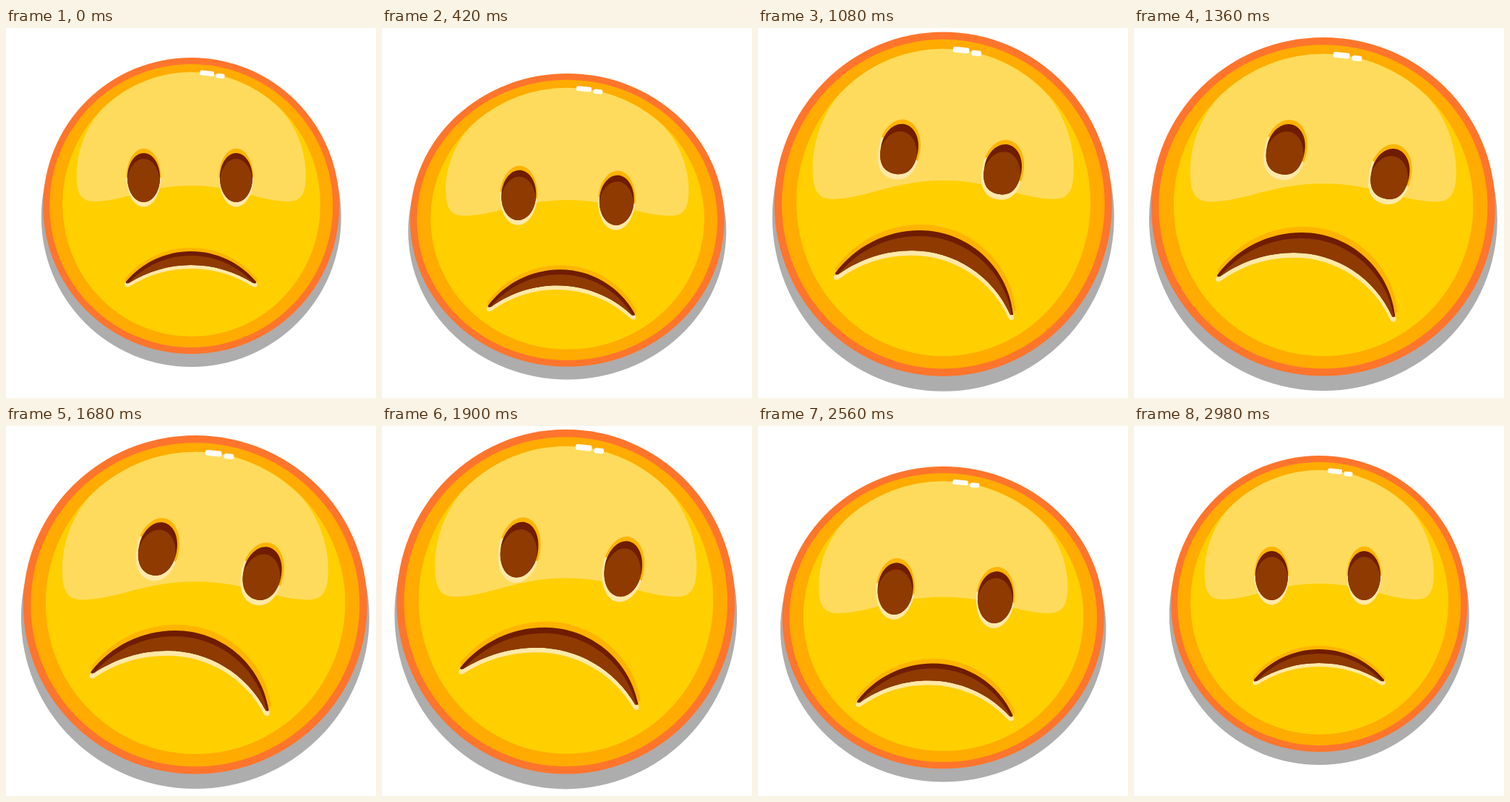
An HTML page with a canvas that plays this animation: 512x512 px, repeating every 3000 ms.

```html
<!DOCTYPE html>
<html lang="en">
<head>
<meta charset="utf-8">
<title>Sad face</title>
<style>
  html, body { margin: 0; width: 100%; height: 100%; overflow: hidden; background: #fff; }
  canvas { display: block; width: 100vmin; height: 100vmin; }
</style>
</head>
<body>
<canvas id="stage" width="512" height="512"></canvas>
<script>
const ctx = document.getElementById('stage').getContext('2d');
const LOOP = 3000, TAU = Math.PI * 2, CX = 256.3;
const SHADE = '#ffb400', CREAM = '#ffe8a8', BROWN = '#8f3a00', DARK = '#701c00';

// Smooth step from 0 at time a to 1 at time b
function ease(t, a, b) {
  const u = Math.min(1, Math.max(0, (t - a) / (b - a)));
  return u * u * (3 - 2 * u);
}
const pulse = (t, a, b, c, d) => ease(t, a, b) - ease(t, c, d);
const swayAt = t => t > 1120 && t < 2080 ? -Math.sin(TAU * (t - 1120) / 320) : 0;

function ellipse(color, x, y, rx, ry) {
  ctx.fillStyle = color;
  ctx.beginPath();
  ctx.ellipse(x, y, rx, ry, 0, 0, TAU);
  ctx.fill();
}

function within(paint) {
  ctx.save();
  paint();
  ctx.restore();
}

const shine = new Path2D(
  'M0-185A178.5 183 0 0 0-119-138C-145-114-158-75-158.5-46' +
  'C-159-17-153-6-134-6C-95-6-60-28 0-28C60-28 95-6 134-6' +
  'C153-6 159-17 158.5-46C158-75 145-114 119-138A178.5 183 0 0 0 0-185Z');

function glint(x, y, w, h) {
  within(() => {
    ctx.translate(x, y);
    ctx.rotate(0.1);
    ctx.fillStyle = '#fff';
    ctx.beginPath();
    ctx.roundRect(-w / 2, -h / 2, w, h, 2.6);
    ctx.fill();
  });
}

function drawBody(x, y, rx, ry) {
  within(() => {
    ctx.translate(x, y);
    ctx.scale(rx / 205, ry / 205);
    ellipse('rgba(0,0,0,.32)', 0, 15.5, 207.5, 207.5);
    ellipse('#ff752c', 0, 0, 205, 205);
    ellipse('#ffab00', 0, 0, 196, 196);
    ellipse('#ffcf00', 0.3, -2, 178.5, 183);
    ctx.fillStyle = '#ffdb5d';
    ctx.fill(shine);
    glint(21.8, -183.4, 19.8, 6.8);
    glint(40.2, -179.6, 12, 6.4);
  });
}

// Upper half is an ellipse; square pushes out the corners of the lower half
function eyePath(w, h, square) {
  const k = 0.5523, p = new Path2D();
  p.moveTo(-w, 0);
  p.bezierCurveTo(-w, -h * k, -w * k, -h, 0, -h);
  p.bezierCurveTo(w * k, -h, w, -h * k, w, 0);
  p.bezierCurveTo(w, h * k, w * (k + square), h, 0, h);
  p.bezierCurveTo(-w * (k + square), h, -w, h * k, -w, 0);
  return p;
}

function drawEye(x, y, tilt, w, h, square, mood) {
  within(() => {
    ctx.translate(x, y);
    ctx.rotate(tilt);
    const turn = 0.4 * mood, rim = w + 1.3 + 1.5 * mood;
    const halo = (color, top, height) => within(() => {
      ctx.rotate(turn);
      ctx.beginPath();
      ctx.rect(-60, top, 120, 60);
      ctx.clip();
      ctx.rotate(-turn);
      ctx.fillStyle = color;
      ctx.fill(eyePath(rim, height, square));
    });
    halo(SHADE, -60, h + 6.2);
    halo(CREAM, 0, h + 6.4 + mood);
    const eye = eyePath(w, h, square);
    ctx.fillStyle = DARK;
    ctx.fill(eye);
    ctx.clip(eye);
    ctx.translate(0, 8 + 2.5 * mood);
    ctx.fillStyle = BROWN;
    ctx.fill(eye);
  });
}

// Bezier handles of the circular arc from a level apex to a lower end
function arcHandles(ax, ay, px, py) {
  const w = px - ax, d = py - ay, turn = 2 * Math.atan2(d, Math.abs(w));
  const k = 4 / 3 * Math.tan(turn / 4) * (w * w + d * d) / (2 * d);
  const side = Math.sign(w);
  return [ax + side * k, ay, px - side * k * Math.cos(turn), py - k * Math.sin(turn)];
}

function mouthPath(x, y, half, rise, lip, mood) {
  const [x0, y0, x1, y1] = [x - half, y - rise, x + half, y + rise];
  const tx = x - 0.05 * half * mood, bx = tx - 11 * mood;
  const by = lip + 19 + 9 * mood;
  const p = new Path2D();
  const fall = (ax, ay, px, py) => p.bezierCurveTo(...arcHandles(ax, ay, px, py), px, py);
  const climb = (px, py, ax, ay) => {
    const [hx, hy, ex, ey] = arcHandles(ax, ay, px, py);
    p.bezierCurveTo(ex, ey, hx, hy, ax, ay);
  };
  p.moveTo(tx, lip);
  fall(tx, lip, x1, y1 - 1);
  p.quadraticCurveTo(x1 + 1, y1 + 2.5, x1 - 4, y1 + 1);
  climb(x1 - 4, y1 + 1, bx, by);
  fall(bx, by, x0 + 4, y0 + 1);
  p.quadraticCurveTo(x0 - 1, y0 + 2.5, x0, y0 - 1);
  climb(x0, y0 - 1, tx, lip);
  p.closePath();
  return p;
}

function drawMouth(path, mood) {
  ctx.lineWidth = 3;
  ctx.lineJoin = 'round';
  const halo = (color, dx, dy) => within(() => {
    ctx.translate(dx, dy);
    ctx.fillStyle = ctx.strokeStyle = color;
    ctx.fill(path);
    ctx.stroke(path);
  });
  halo(SHADE, 1.8 * mood, -3.5 - 3 * mood);
  halo(CREAM, -0.5 * mood, 3.5 + 1.7 * mood);
  ctx.fillStyle = DARK;
  ctx.fill(path);
  within(() => {
    ctx.clip(path);
    ctx.translate(-mood, 6 + 2 * mood);
    ctx.fillStyle = BROWN;
    ctx.fill(path);
  });
}

function draw(t) {
  const mood = pulse(t, 0, 1060, 2350, 2790);
  const squash = pulse(t, 0, 420, 420, 1190) + pulse(t, 2160, 2540, 2560, 2740)
    - 0.15 * pulse(t, 2700, 2800, 2800, 2920);
  const squint = pulse(t, 300, 1000, 1240, 2120);
  const sway = swayAt(t), dip = sway * sway;
  const mix = (calm, sad) => calm + (sad - calm) * mood;

  const r = mix(205, 233.5) + 2.5 * squash + 4.5 * dip;
  const top = mix(41, 3.5) + 35 * squash + 9.5 * dip;
  const bottom = mix(451, 481.5) + 7 * squash;
  ctx.clearRect(0, 0, 512, 512);
  drawBody(CX + 5.5 * sway, (top + bottom) / 2, r, (bottom - top) / 2);

  const drop = 36 * squash + 5 * dip, k = r / 205;
  const tilt = (11.2 * mood - squash + 2 * sway) * Math.PI / 180;
  const eyeX = mix(254.5, 267.5) - 2 * squash + 15 * sway;
  const eyeY = mix(207, 184.5) - 5 * squint + drop;
  const eyeH = mix(34, 39.5) - 4.5 * squint - squash;
  for (const side of [-64 * k, 64 * k]) {
    drawEye(eyeX + side * Math.cos(tilt), eyeY + side * Math.sin(tilt),
      tilt, 22.6 * k, eyeH, 0.22 * squint, mood);
  }

  drawMouth(mouthPath(
    mix(256, 235) - 5 * squint + 8 * sway,
    mix(352, 358) + 8 * squint + drop,
    mix(90, 123),
    24 * mood + 4 * squint - 3 * squash,
    mix(309, 278) + drop,
    mood), mood);
}

const start = performance.now();
function tick() {
  draw((performance.now() - start) % LOOP);
  requestAnimationFrame(tick);
}
tick();
</script>
</body>
</html>
```
